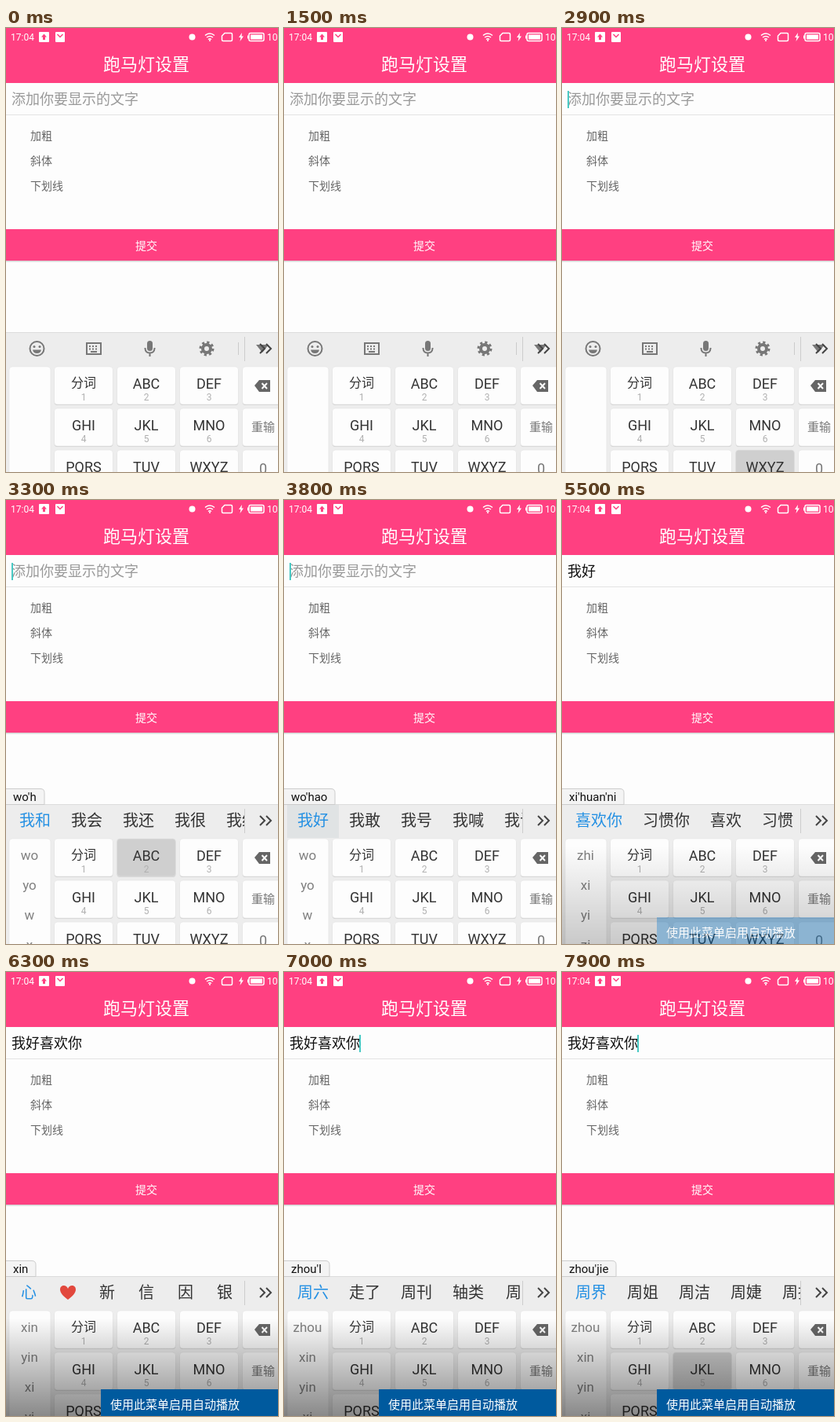
Write an HTML page that moves like this. It is 347 by 565 pixels and loops after 8 s.

```html
<!DOCTYPE html>
<html lang="zh-CN">
<head>
<meta charset="utf-8">
<style>
  html, body { margin: 0; width: 100%; height: 100%; overflow: hidden; background: #fdfdfd; }
  svg { display: block; width: 347px; height: 565px; font-family: Roboto, "Noto Sans CJK SC", "Noto Sans CJK", sans-serif; }
  .mid { text-anchor: middle; }
  .icon { fill: #777; }
  .line { fill: none; stroke: #777; stroke-width: 2; }
  .white { fill: none; stroke: #fff; stroke-width: 1.5; }
</style>
</head>
<body>
<svg viewBox="0 0 347 565">
  <defs>
    <linearGradient id="shade" x1="0" y1="0" x2="0" y2="1">
      <stop offset="0" stop-opacity="0"/><stop offset="1" stop-opacity=".46"/>
    </linearGradient>
    <clipPath id="strip"><path d="M0 387H304V431H0z"/></clipPath>
  </defs>
  <path fill="#fdfdfd" d="M0 0H347V565H0z"/>
  <path fill="#ff4081" d="M0 0H347V70H0z"/>

  <!-- status bar -->
  <g fill="#fff" font-size="12">
    <text x="6" y="16">17:04</text>
    <text x="333" y="16">100%</text>
    <rect x="42" y="5" width="13" height="13" rx="1"/>
    <path fill="#ff4081" d="M48.5 7.5L52 11.5H50V15H47V11.5H45z"/>
    <rect x="63" y="5" width="12" height="13" rx="1"/>
    <path d="M65.5 8L69 11.5L72.5 8" fill="none" stroke="#ff4081" stroke-width="1.5"/>
    <circle cx="237.500" cy="11.500" r="4"/>
    <path class="white" d="M254 9.500Q260 4.500 266 9.500M256 12Q260 8.800 264 12M258 14.500Q260 13 262 14.500"/>
    <circle cx="260" cy="16" r="1"/>
    <path class="white" d="M279 6.500H287Q288.500 6.500 288.500 8V15Q288.500 16.500 287 16.500H277Q275.500 16.500 275.500 15V10z"/>
    <path d="M301 6L297 12H299.500L298.500 17L303 10.500H300.500z"/>
    <rect class="white" x="310" y="6.500" width="19" height="10" rx="2"/>
    <path d="M312 8.500H327V14.500H312zM308 9.500H309.500V13.500H308z"/>
  </g>
  <text class="mid" x="179" y="54" font-size="22" font-weight="300" fill="#fff">跑马灯设置</text>

  <!-- form -->
  <text id="hint" x="7" y="97" font-size="18" fill="#999">添加你要显示的文字</text>
  <text id="entry" x="7" y="97" font-size="18" fill="#111"></text>
  <rect id="cursor" y="80" width="2" height="22" fill="#48c9c4"/>
  <path fill="#e4e4e4" d="M0 110H347V111H0z"/>
  <g font-size="14" fill="#666">
    <text x="31" y="142">加粗</text><text x="31" y="174">斜体</text><text x="31" y="206">下划线</text>
  </g>
  <path fill="#d4d4d4" d="M0 296H347V297.500H0z"/>
  <path fill="#ff4081" d="M0 256H347V296H0z"/>
  <text class="mid" x="179" y="282" font-size="14" font-weight="500" fill="#fff">提交</text>

  <!-- keyboard -->
  <path fill="#ededed" d="M0 387H347V565H0z"/>
  <path fill="#dcdcdc" d="M0 387H347V388H0z"/>
  <g id="tools">
    <circle class="line" cx="39.500" cy="408" r="9"/>
    <circle class="icon" cx="36" cy="405.500" r="1.500"/><circle class="icon" cx="43" cy="405.500" r="1.500"/>
    <path class="icon" d="M34 409.500H45Q44 414 39.500 414T34 409.500z"/>
    <rect class="line" x="103" y="401" width="18" height="14"/>
    <path class="line" stroke-dasharray="2 2" d="M106 405H118M106 408.500H118"/>
    <path class="line" d="M108 412H116"/>
    <rect class="icon" x="180" y="398" width="7" height="13" rx="3.500"/>
    <path class="line" d="M177.500 407V408Q178 413.500 183.500 413.500T189.500 408V407M183.500 413V418"/>
    <circle class="line" cx="256" cy="408" r="5" style="stroke-width:4"/>
    <circle class="line" cx="256" cy="408" r="8" style="stroke-width:3" stroke-dasharray="3.140"/>
    <path fill="#ccc" d="M296 400H297V416H296z"/>
    <path class="icon" d="M319 403H335L327 413z"/>
  </g>
  <g id="suggest">
    <path id="bubble" fill="#f4f4f4" stroke="#ccc"/>
    <text id="pinyin" x="9" y="383" font-size="15" fill="#111"></text>
    <path id="picked" fill="#e0e3e4"/>
    <g id="words" clip-path="url(#strip)" font-size="20"></g>
    <path fill="#ccc" d="M304 393H305V424H304z"/>
    <path d="M324 402L330 408L324 414M332 402L338 408L332 414" fill="none" stroke="#444" stroke-width="2"/>
  </g>
  <g id="keys"></g>
  <g id="column" class="mid" font-size="17" fill="#808080"></g>
  <path fill="#666" d="M317 455L323 448H337V463H323z"/>
  <path d="M326.500 452L333 459M333 452L326.500 459" stroke="#fdfdfd" stroke-width="2"/>

  <g id="tip">
    <path fill="url(#shade)" d="M0 440H347V565H0z"/>
    <path fill="#005a9e" d="M121 531H347V565H121z"/>
    <text x="133" y="556" font-size="15" fill="#fff">使用此菜单启用自动播放</text>
  </g>
</svg>
<script>
const LOOP = 8000;
const $ = id => document.getElementById(id);

function add(parent, tag, attrs, text = '') {
  const el = document.createElementNS('http://www.w3.org/2000/svg', tag);
  for (const name in attrs) el.setAttribute(name, attrs[name]);
  el.textContent = text;
  parent.append(el);
  return el;
}

// Keys
const keyFaces = {};
function addKey(x, y, width, height = 48) {
  add($('keys'), 'rect', { x, y: y + 1, width, height, rx: 4, fill: '#d2d2d2' });
  return add($('keys'), 'rect', { x, y, width, height, rx: 4, fill: '#fdfdfd', stroke: '#e2e2e2', 'stroke-width': .6 });
}
addKey(4, 431, 53, 150);
['分词', 'ABC', 'DEF', 'GHI', 'JKL', 'MNO', 'PQRS', 'TUV', 'WXYZ'].forEach((label, i) => {
  const x = 61 + i % 3 * 80, y = 431 + Math.floor(i / 3) * 53;
  keyFaces[label] = addKey(x + .5, y, 75);
  const style = i ? { y: y + 28, 'font-size': 18 } : { y: y + 26, 'font-size': 16, 'font-weight': 500 };
  add($('keys'), 'text', { class: 'mid', x: x + 38, fill: '#333', ...style }, label);
  add($('keys'), 'text', { class: 'mid', x: x + 38, y: y + 43, 'font-size': 12, fill: '#b0b0b0' }, i + 1);
});
['', '重输', '0'].forEach((label, i) => {
  addKey(301.5, 431 + i * 53, 60);
  add($('keys'), 'text', { class: 'mid', x: 328, y: i < 2 ? 513 : 567, 'font-size': i < 2 ? 15 : 18, fill: '#777' }, label);
});

// Each stroke: press time, release time, key, then what the keyboard shows on release.
const strokes = [
  [2900, 3000, 'WXYZ', 'w', 'w x y z', '我 在 一 想 下 这'],
  [3100, 3200, 'MNO', 'wo', 'wo yo w x', '我 哦 用 又 问 窝'],
  [3200, 3300, 'GHI', "wo'h", 'wo yo w x', '我和 我会 我还 我很 我给'],
  [3300, 3400, 'ABC', "wo'ha", 'wo yo w x', '我爱 我还 我把 我才 我被'],
  [3500, 3600, 'MNO', "wo'hao", 'wo yo w x', '我好 我敢 我号 我喊 我该'],
  [4500, 4600, 'WXYZ', 'x', 'w x y z', '在 一 想 下 这 我'],
  [4600, 4700, 'GHI', 'xi', 'zhi xi yi zi', '一 系 西 洗 以 系'],
  [4700, 4800, 'GHI', "xi'h", 'zhi xi yi zi', '喜欢 一个 以后 一会 之后'],
  [4800, 4900, 'TUV', "xi'gu", 'zhi xi yi zi', '西湖 以后 一股 字库 喜股'],
  [4900, 5100, 'ABC', "xi'gua", 'zhi xi yi zi', '西瓜 🍉 西华 一挂 字画'],
  [5100, 5200, 'MNO', "xi'huan", 'zhi xi yi zi', '喜欢 习惯 一换 西关 字幻'],
  [5300, 5400, 'MNO', "xi'huan'n", 'zhi xi yi zi', '喜欢你 习惯你 喜欢 习惯'],
  [5400, 5500, 'GHI', "xi'huan'ni", 'zhi xi yi zi', '喜欢你 习惯你 喜欢 习惯'],
  [5900, 6100, 'WXYZ', 'x', 'w x y z', '在 一 想 下 这 我'],
  [6100, 6200, 'GHI', 'xi', 'zhi xi yi zi', '一 系 西 洗 以 系'],
  [6200, 6300, 'MNO', 'xin', 'xin yin xi yi', '心 ❤ 新 信 因 银'],
  [6500, 6600, 'TUV', 'zhou', 'zhou xin yin xi', '周 粥 州 轴 皱 洲'],
  [6700, 6800, 'JKL', "zhou'l", 'zhou xin yin xi', '周六 走了 周刊 轴类 周'],
  [7300, 7400, 'GHI', "zhou'li", 'zhou xin yin xi', '周期 周里 州里 皱起 周'],
  [7700, 7800, 'DEF', "zhou'jie", 'zhou xin yin xi', '周界 周姐 周洁 周婕 周捷'],
  [7900, 8000, 'JKL', '', '', ''],
];
const commits = [[4100, '我好'], [5900, '我好喜欢你']];
const picks = [[3800, 4100], [5700, 5900]];
const blinks = [200, 600, 1100, 1500, 2000, 2500, 2900, 3400, 3800, 4600, 5100, 5500, 5900, 6300, 6800, 7300, 7700];
const within = (t, [from, to]) => t >= from && t < to;

function drawWord(word, x) {
  if (word === '🍉') {
    const g = add($('words'), 'g', { transform: `translate(${x + 25} 408) rotate(28)` });
    add(g, 'path', { d: 'M-11 -3H11Q9 8 0 8T-11 -3z', fill: '#5a9e45' });
    add(g, 'path', { d: 'M-10 -4H10Q8 5.500 0 5.500T-10 -4z', fill: '#f0685f' });
    add(g, 'path', { d: 'M-4 -1V1M0 1V3M4 -1V1', stroke: '#533', 'stroke-width': 1.3 });
  } else if (word === '❤') {
    add($('words'), 'path', { transform: `translate(${x + 25} 408)`, fill: '#e2483d',
      d: 'M0 9C-5 5 -10 1 -10 -4C-10 -10 -2 -11 0 -5C2 -11 10 -10 10 -4C10 1 5 5 0 9z' });
  }
}

let shownStroke;
function showStroke(stroke) {
  if (stroke === shownStroke) return;
  shownStroke = stroke;
  const [, , , pinyin, column, words] = stroke || [0, 0, '', '', '， 。 ? !', ''];
  $('tools').style.display = stroke ? 'none' : '';
  $('suggest').style.display = stroke ? '' : 'none';
  $('column').textContent = $('words').textContent = '';
  column.split(' ').forEach((label, i) => {
    const attrs = { x: !stroke && i < 2 ? 36 : 30, y: 458 + i * 38 - (stroke || i < 2 ? 0 : 1) };
    if (!stroke) attrs['font-weight'] = 500;
    add($('column'), 'text', attrs, label);
  });
  if (!stroke) return;

  $('pinyin').textContent = pinyin;
  const right = Math.round($('pinyin').getComputedTextLength()) + 19;
  $('bubble').setAttribute('d', `M-1 387.500V367.500H${right - 5}Q${right} 367.500 ${right} 372.500V387.500z`);
  let x = 4;
  words.split(' ').forEach((word, i) => {
    const drawn = word === '🍉' || word === '❤';
    const width = drawn ? 50 : Math.max(50, word.length * 20 + 26);
    if (drawn) drawWord(word, x);
    else add($('words'), 'text', { class: 'mid', x: x + width / 2, y: 415, fill: i ? '#333' : '#2490e3' }, word);
    if (!i) $('picked').setAttribute('d', `M4 388H${4 + width}V430H4z`);
    x += width;
  });
}

function render(time) {
  const t = Math.floor(time % LOOP / 100) * 100;
  const commit = commits.filter(c => t >= c[0]).pop() || [0, ''];
  const text = commit[1];
  showStroke(strokes.filter(s => s[3] && t >= s[1] && s[1] > commit[0]).pop());

  for (const label in keyFaces) {
    const pressed = strokes.some(s => s[2] === label && within(t, s));
    keyFaces[label].setAttribute('fill', pressed ? '#cfcfcf' : '#fdfdfd');
  }
  $('picked').style.display = picks.some(p => within(t, p)) ? '' : 'none';
  $('hint').style.display = text ? 'none' : '';
  $('entry').textContent = text;
  $('cursor').setAttribute('x', 7 + text.length * 18 - (text ? 1 : 0));

  const toggles = blinks.filter(b => t >= b).length;
  $('cursor').style.display = toggles % 2 ? '' : 'none';
  $('tip').setAttribute('opacity', Math.min(1, Math.max(0, (t - 5300) / 450)));
}

const start = performance.now();
(function tick() {
  render(performance.now() - start);
  requestAnimationFrame(tick);
})();
</script>
</body>
</html>
```
